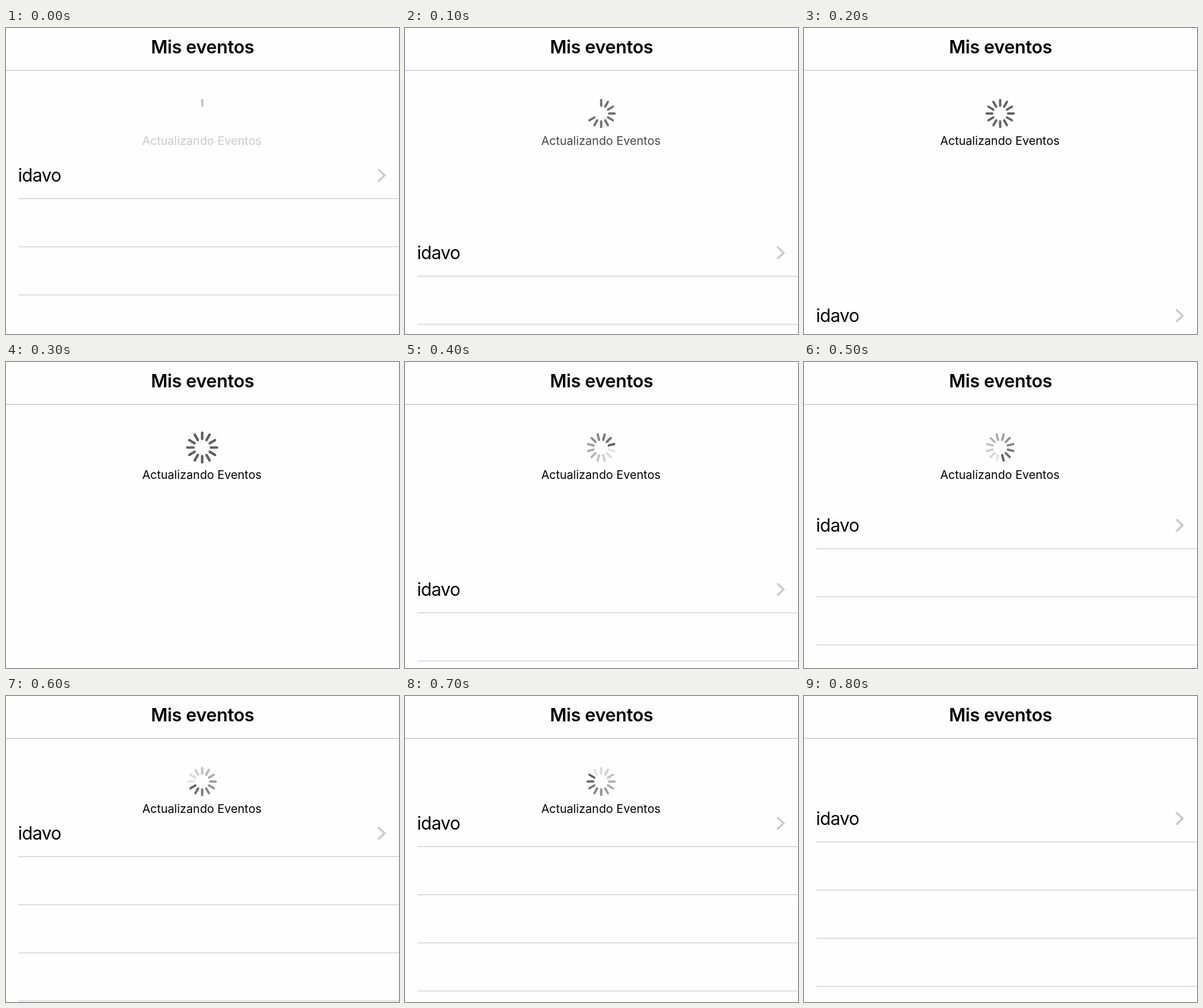
Animation, 587 px wide and 458 px high, one loop 0.9 s. Source, as an HTML page:

```html
<!DOCTYPE html>
<html lang="es">
<head>
<meta charset="utf-8">
<title>Mis eventos</title>
<style>
  html, body { margin: 0; width: 100%; height: 100%; overflow: hidden; background: #fefdff; }
  svg { display: block; width: 587px; height: 458px; font-family: Inter, sans-serif; }
  .title { font-size: 27px; font-weight: 600; letter-spacing: -.3px; }
  .status { font-size: 17.5px; }
  .event { font-size: 26.5px; letter-spacing: -.6px; }
  .rule { stroke: #c9c8cd; }
</style>
</head>
<body>
<svg viewBox="0 0 587 458">
  <g id="refresh">
    <g id="spinner" stroke="#5f6064" stroke-width="3.4" stroke-linecap="round"></g>
    <text class="status" x="292.5" y="174.5" text-anchor="middle">Actualizando Eventos</text>
  </g>
  <g id="list">
    <text class="event" x="18" y="-26">idavo</text>
    <path d="M556-44l9.5 9-9.5 9" fill="none" stroke="#c7c7cc" stroke-width="3"/>
  </g>
  <text class="title" x="293.5" y="38" text-anchor="middle">Mis eventos</text>
  <path d="M0 63.5H587" stroke="#bdbcc0"/>
</svg>
<script>
const STEP = 100, TICKS = 12, ROW = 72;
// y: first separator, ticks: spokes shown, head: darkest spoke while spinning
const poses = [
  { y: 255.5, ticks: 1, alpha: .2 },
  { y: 371.5, ticks: 9, alpha: .72, tint: 1.25 },
  { y: 465.5 },
  { y: 520.5, scale: 1.1 },
  { y: 375.5, head: 2, turn: 15 },
  { y: 279.5, head: 5, turn: 15 },
  { y: 240.5, head: 8 },
  { y: 225.5, head: 10 },
  { y: 218.5, alpha: 0 }
];

const byId = id => document.getElementById(id);
const spinner = byId('spinner'), list = byId('list'), refresh = byId('refresh');
const status = refresh.querySelector('text');

function addLine(parent, attributes) {
  const line = document.createElementNS('http://www.w3.org/2000/svg', 'line');
  for (const name in attributes) line.setAttribute(name, attributes[name]);
  return parent.appendChild(line);
}

const spokes = Array.from({ length: TICKS }, (_, i) =>
  addLine(spinner, { y1: -20.2, y2: -11.8, transform: `rotate(${i * 360 / TICKS})` }));
for (let i = 0; i < 4; i++)
  addLine(list, { class: 'rule', x1: 18.5, x2: 587, y1: i * ROW, y2: i * ROW });

function spokeOpacity(i, ticks, head) {
  if (i >= ticks) return 0;
  if (head === undefined) return 1;
  const age = (head - i + TICKS) % TICKS;
  return 1 - .85 * age / (TICKS - 1);
}

function draw(now) {
  const pose = poses[Math.floor(now / STEP) % poses.length];
  const { y, ticks = TICKS, alpha = 1, tint = 1, head, turn = 0, scale = 1 } = pose;
  list.setAttribute('transform', `translate(0 ${y})`);
  status.setAttribute('opacity', alpha);
  spinner.setAttribute('opacity', Math.min(1, alpha * tint + (ticks === 1 ? .15 : 0)));
  spinner.setAttribute('transform', `translate(293 128) rotate(${turn}) scale(${scale})`);
  spokes.forEach((spoke, i) => spoke.setAttribute('opacity', spokeOpacity(i, ticks, head)));
  refresh.setAttribute('visibility', alpha ? 'visible' : 'hidden');
}

const start = performance.now();
function tick() {
  draw(performance.now() - start);
  requestAnimationFrame(tick);
}
tick();
</script>
</body>
</html>
```
